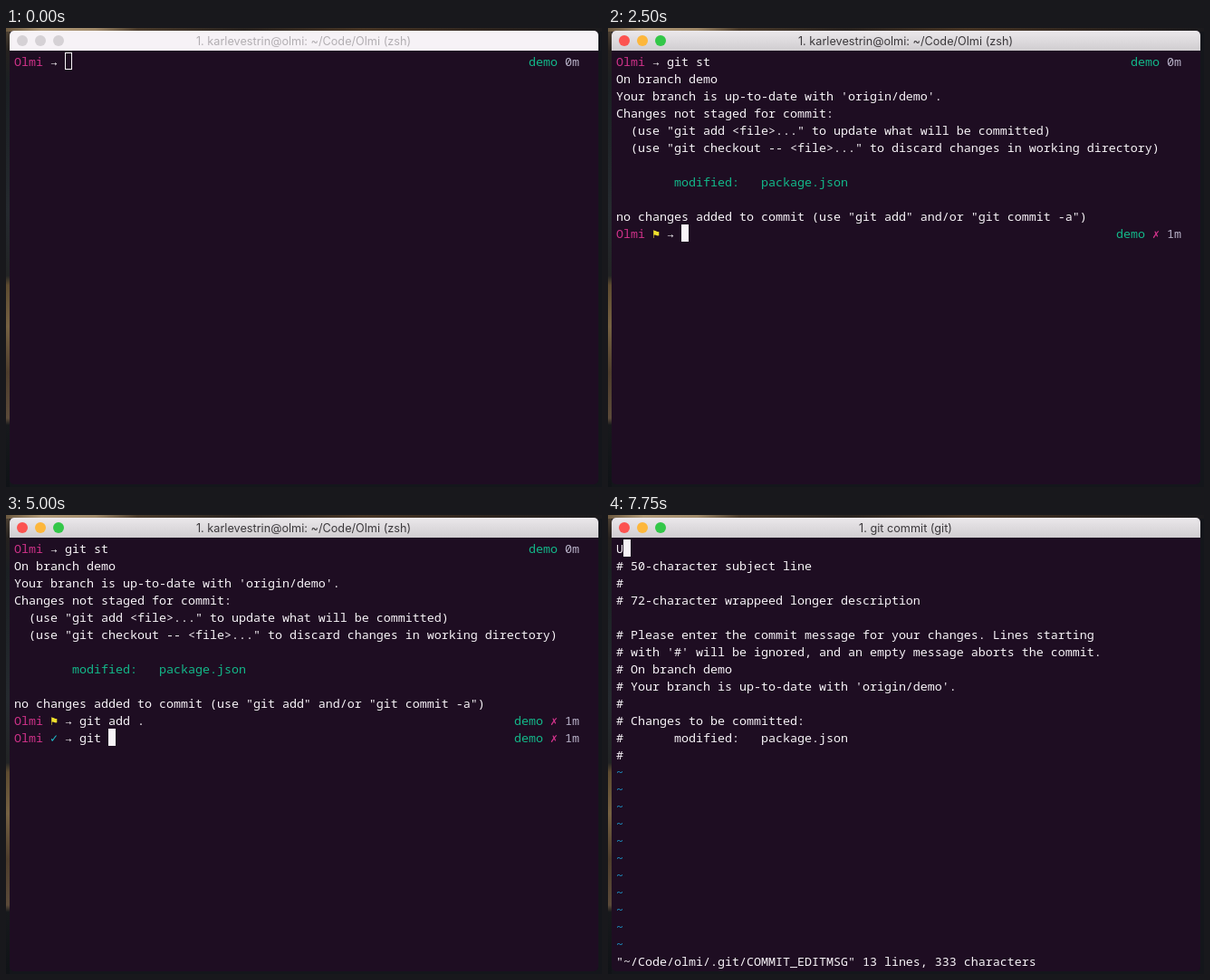
Write an HTML page with a canvas that moves like this. It is 658x507 px and loops after 8 s.

```html
<!DOCTYPE html>
<html lang="en">
<head>
<meta charset="utf-8">
<title>Terminal session</title>
<style>
  html, body { margin: 0; width: 100%; height: 100%; overflow: hidden; background: #14161b; }
  canvas { display: block; }
</style>
</head>
<body>
<canvas id="stage" width="658" height="507"></canvas>
<script>
const ctx = document.getElementById('stage').getContext('2d');
const LOOP = 8000, CELL = 8, LINE = 19, LEFT = 9, TOP = 27;
const MONO = '13.333px "Noto Sans Mono", "DejaVu Sans Mono", monospace';
const C = {
  white: '#f8f4f8', pink: '#cf3289', green: '#13b88a', grey: '#b9b3c9',
  yellow: '#f0e02c', cyan: '#1fc1cf', blue: '#1c9fd4', back: '#1e0d22'
};

const STATUS = [
  'On branch demo',
  "Your branch is up-to-date with 'origin/demo'.",
  'Changes not staged for commit:',
  '  (use "git add <file>..." to update what will be committed)',
  '  (use "git checkout -- <file>..." to discard changes in working directory)',
  '', '', '',
  'no changes added to commit (use "git add" and/or "git commit -a")'
];
const MESSAGE = [
  '# 50-character subject line',
  '#',
  '# 72-character wrappeed longer description',
  '',
  '# Please enter the commit message for your changes. Lines starting',
  "# with '#' will be ignored, and an empty message aborts the commit.",
  '# On branch demo',
  "# Your branch is up-to-date with 'origin/demo'.",
  '#',
  '# Changes to be committed:',
  '#       modified:   package.json',
  '#'
];

// Each key is [time, characters typed so far].
const COMMANDS = [
  { row: 0, start: 0, end: 2500, text: 'git st', age: '0m',
    keys: [[1750, 3], [2000, 4], [2250, 6]] },
  { row: 10, start: 2500, end: 4250, text: 'git add .', age: '1m', mark: '⚑', tint: C.yellow,
    keys: [[3000, 2], [3250, 4], [3500, 5], [3750, 7], [4000, 9]] },
  { row: 11, start: 4500, end: 6250, text: 'git commit', age: '1m', mark: '✓', tint: C.cyan,
    keys: [[4750, 2], [5000, 4], [5250, 6], [5500, 7], [5750, 8], [6000, 10]] }
];

function rect(x, y, w, h, fill) {
  ctx.fillStyle = fill;
  ctx.fillRect(x, y, w, h);
}

function gradient(x, y, stops) {
  const g = ctx.createLinearGradient(0, 0, x, y);
  stops.forEach(([at, color]) => g.addColorStop(at, color));
  return g;
}

function put(col, row, text, color = C.white, weight = 500) {
  ctx.font = `${weight} ${MONO}`;
  ctx.textAlign = 'left';
  ctx.fillStyle = color;
  ctx.fillText(text, LEFT + col * CELL, TOP + 15 + row * LINE);
}

function cursor(col, row, filled = true) {
  const x = LEFT + col * CELL, y = TOP + row * LINE;
  if (filled) return rect(x, y, CELL, LINE, C.white);
  ctx.strokeStyle = C.white;
  ctx.lineWidth = 1;
  ctx.strokeRect(x + .5, y + .5, CELL - 1, LINE - 1);
}

function drawDesktop() {
  rect(0, 0, 658, 507, '#14161b');
  rect(0, 0, 658, 4, gradient(658, 0, [
    [0, '#6d5a40'], [.06, '#b09a78'], [.15, '#a08a6a'], [.22, '#4b3c2c'],
    [.4, '#2a2420'], [.6, '#493726'], [.8, '#30261f'], [1, '#1b1a1d']
  ]));
  rect(0, 4, 4, 503, gradient(0, 507, [
    [0, '#514435'], [.05, '#25211f'], [.12, '#1b2023'], [.4, '#252a2f'], [.54, '#222425'],
    [.56, '#5d4b30'], [.65, '#756142'], [.75, '#4d3d2c'], [.85, '#5b4a39'],
    [.865, '#17191c'], [1, '#101317']
  ]));
}

function drawWindow(active, title) {
  ctx.save();
  ctx.beginPath();
  ctx.roundRect(4, 3, 650, 501, 5);
  ctx.clip();
  rect(4, 3, 650, 501, C.back);
  rect(4, 3, 650, 22, active ? gradient(0, 25, [[.12, '#ebe8eb'], [1, '#d0cdd0']]) : '#f6f2f6');
  ctx.restore();
  ['#fc5350', '#fdb73c', '#33c748'].forEach((color, i) => {
    ctx.beginPath();
    ctx.arc(18 + i * 20, 14, 6, 0, 7);
    ctx.fillStyle = active ? color : '#d5d1d5';
    ctx.fill();
  });
  ctx.font = '12.7px Inter, "Open Sans", sans-serif';
  ctx.textAlign = 'center';
  ctx.fillStyle = active ? '#3b383b' : '#b2aeb2';
  ctx.fillText(title, 328.5, 19);
}

function drawCommand(cmd, t) {
  const { row, start, end, text, age, mark, tint, keys } = cmd;
  if (t < start) return;
  put(0, row, 'Olmi', C.pink);
  if (mark) put(5, row, mark, tint);
  const arrow = mark ? 7 : 5;
  put(arrow, row, '→', C.white, 700);
  const typed = keys.reduce((n, [at, count]) => t >= at ? count : n, 0);
  put(arrow + 2, row, text.slice(0, typed));
  put(mark ? 69 : 71, row, 'demo', C.green);
  if (mark) put(74, row, '✗', C.pink);
  put(76, row, age, C.grey);
  if (t < end) cursor(arrow + 2 + typed, row, t >= 500);
}

function drawShell(t) {
  if (t >= 2500) {
    STATUS.forEach((line, i) => put(0, i + 1, line));
    put(8, 7, 'modified:   package.json', C.green);
  }
  COMMANDS.forEach(cmd => drawCommand(cmd, t));
  if (t >= 4250 && t < 4500) cursor(0, 11);
}

function drawEditor(t) {
  const typed = t >= 7750 ? 'U' : '';
  put(0, 0, typed);
  cursor(typed.length, 0);
  MESSAGE.forEach((line, i) => put(0, i + 1, line));
  for (let row = 13; row < 24; row++) put(0, row, '~', C.blue);
  put(0, 24, '"~/Code/olmi/.git/COMMIT_EDITMSG" 13 lines, 333 characters');
}

function frame() {
  const t = performance.now() % LOOP;
  const editing = t >= 6250;
  const title = !editing ? '1. karlevestrin@olmi: ~/Code/Olmi (zsh)'
    : `1. git commit (${t < 7250 ? 'vim' : 'git'})`;
  drawDesktop();
  drawWindow(t >= 500, title);
  (editing ? drawEditor : drawShell)(t);
  requestAnimationFrame(frame);
}
frame();
</script>
</body>
</html>
```
